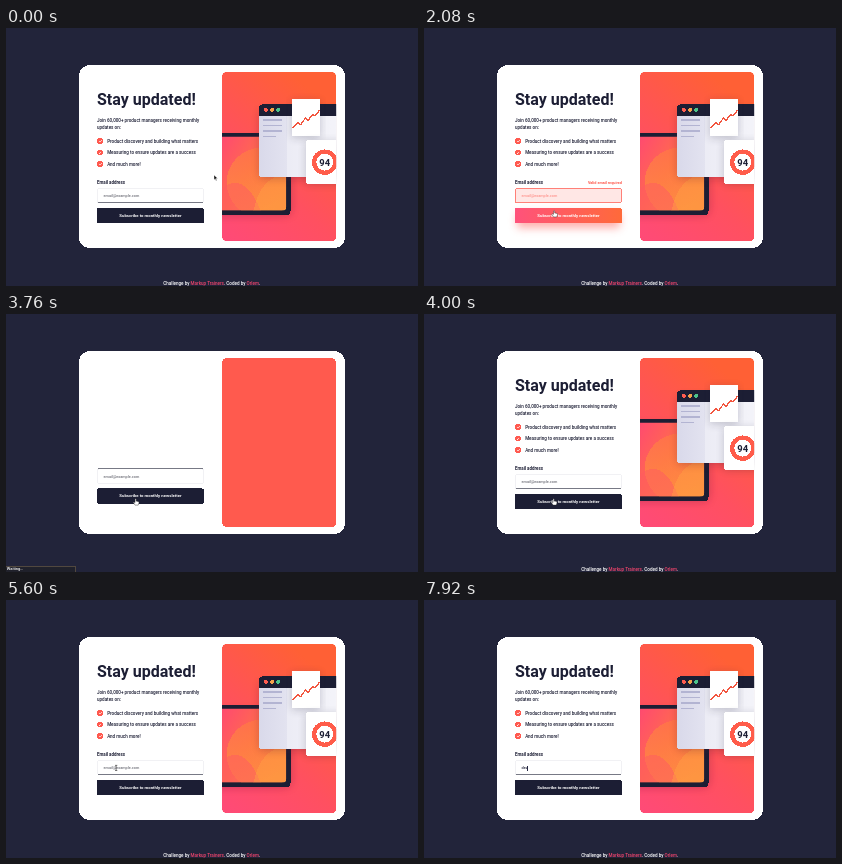
These frames come from a looping animation (412x258 px, 8000 ms). An HTML page:

```html
<!DOCTYPE html>
<html lang="en">
<head>
<meta charset="utf-8">
<title>Newsletter sign-up</title>
<style>
  html, body { margin: 0; width: 100%; height: 100%; overflow: hidden; background: #22243a; }
  svg { display: block; width: 100vw; height: 100vh; font: 500 16px Roboto, sans-serif; fill: #1c1e34; }
  .bold { font-weight: 700; }
  .small { font-size: 13.33px; }
  .link { fill: #f0446c; }
</style>
</head>
<body>
<svg viewBox="0 0 1440 901.75" shape-rendering="crispEdges">
  <defs>
    <linearGradient id="hot"><stop stop-color="#ff527b"/><stop offset="1" stop-color="#ff6a3a"/></linearGradient>
    <linearGradient id="backdrop" x1="0" y1="1" x2=".6" y2="0">
      <stop stop-color="#ff4a78"/><stop offset=".45" stop-color="#ff5060"/><stop offset="1" stop-color="#ff6035"/>
    </linearGradient>
    <linearGradient id="screen" x1="0" y1="0" x2="1" y2=".7">
      <stop stop-color="#ff4a70"/><stop offset=".5" stop-color="#ff6a4e"/><stop offset="1" stop-color="#fb9440"/>
    </linearGradient>
    <linearGradient id="glow" x1="0" y1="1" x2="1" y2="0">
      <stop stop-color="#ff9a3c"/><stop offset="1" stop-color="#ff6d45"/>
    </linearGradient>
    <linearGradient id="pane"><stop stop-color="#d9d9ea"/><stop offset="1" stop-color="#f7f7fc"/></linearGradient>
    <filter id="blur" x="-20%" y="-80%" width="140%" height="260%"><feGaussianBlur stdDeviation="14"/></filter>
    <clipPath id="art"><rect x="755" y="154" width="399" height="591" rx="17"/></clipPath>
    <clipPath id="display"><path d="M700 379H980V625Q980 638 967 638H700Z"/></clipPath>
  </defs>

  <rect x="255" y="130" width="930" height="639" rx="38" fill="#fff"/>

  <rect x="755" y="154" width="399" height="591" rx="17" fill="#ff5a4e"/>
  <g id="page">
    <g clip-path="url(#art)">
      <rect x="755" y="154" width="400" height="591" fill="url(#backdrop)"/>
      <path d="M700 388H980Q996 390 996 410V632Q996 653 975 653H700Z" fill="#7c1838" opacity=".4" filter="url(#blur)"/>
      <path d="M700 367H978Q995 367 995 384V637Q995 655 977 655H700Z"/>
      <g clip-path="url(#display)">
        <rect x="755" y="378" width="225" height="260" fill="url(#screen)"/>
        <circle cx="893" cy="540" r="122" fill="url(#glow)" opacity=".6"/>
        <path d="M755 560Q835 500 890 638H755Z" fill="#ff5a63" opacity=".5"/>
        <path d="M865 638Q890 520 980 510V638Z" fill="#ffa044" opacity=".45"/>
      </g>

      <rect x="888" y="290" width="290" height="235" fill="#57132f" opacity=".32" filter="url(#blur)"/>
      <rect x="885" y="268" width="300" height="253" rx="10" fill="url(#pane)"/>
      <path d="M885 306V278Q885 267 896 267H1160V306Z"/>
      <circle cx="908" cy="286" r="7" fill="#ff5c50"/>
      <circle cx="930" cy="286" r="7" fill="#f5a04a"/>
      <circle cx="951" cy="286" r="7" fill="#4cc38a"/>
      <path d="M982 306H1160V521H982Z" fill="#f4f4fa" opacity=".55"/>
      <path d="M899 322H965M899 341H965M899 360H965M899 379H945" stroke="#b3b4d2" stroke-width="5"/>

      <rect x="1000" y="255" width="98" height="128" opacity=".22" filter="url(#blur)"/>
      <rect x="1000" y="248" width="98" height="130" rx="3" fill="#fff"/>
      <path d="M1001 350L1020 330L1030 338L1046 315L1056 323L1071 303L1081 306L1097 286" fill="none" stroke="#f2553f" stroke-width="4.5"/>

      <rect x="1047" y="400" width="130" height="145" opacity=".22" filter="url(#blur)"/>
      <rect x="1047" y="392" width="130" height="153" rx="8" fill="#fff"/>
      <circle cx="1114" cy="469" r="37" fill="none" stroke="#ff5c4a" stroke-width="15"/>
      <text x="1114" y="481" class="bold" font-size="33" text-anchor="middle">94</text>
    </g>

    <text x="318" y="270" class="bold" font-size="56">Stay updated!</text>
    <text x="318" y="328">Join 60,000+ product managers receiving monthly</text>
    <text x="318" y="354">updates on:</text>
    <g id="list"></g>
    <text x="318" y="545" class="bold" font-size="15.5">Email address</text>
    <text x="719" y="897" text-anchor="middle" fill="#fff">Challenge by <tspan class="link">Markup Trainers</tspan>. Coded by <tspan class="link">Orlem</tspan>.</text>
  </g>

  <text id="error" x="692" y="545" class="bold small" text-anchor="end" fill="#ff5548">Valid email required</text>
  <g id="form">
    <rect id="field" x="319.5" y="560.5" width="371" height="51" rx="8" stroke-width="3.5"/>
    <path id="edge" stroke="#777985" stroke-width="3.5"/>
    <text id="value" x="341" y="592" class="small"></text>
    <path id="caret" stroke="#242742" stroke-width="3.5"/>

    <rect x="318" y="628" width="374" height="55" rx="8"/>
    <g id="hover">
      <rect x="324" y="648" width="362" height="50" rx="8" fill="#ff5f5a" opacity=".5" filter="url(#blur)"/>
      <rect x="318" y="628" width="374" height="55" rx="8" fill="url(#hot)"/>
    </g>
    <text x="505" y="660" class="bold" font-size="15" text-anchor="middle" fill="#fff">Subscribe to monthly newsletter</text>
  </g>

  <g id="status">
    <rect x="-4" y="881" width="247" height="30" fill="#20212b" stroke="#51483f" stroke-width="3.5"/>
    <text x="3" y="896" font-size="14" fill="#fff">Waiting…</text>
  </g>

  <g id="cursor" shape-rendering="auto" stroke-width="1.5">
    <path id="arrow" d="M0 0V17L4 13L7 20L10 19L7 12H13Z" fill="#111" stroke="#fff"/>
    <path id="beam" d="M-4 -9H4M0 -9V9M-4 9H4" stroke="#222" stroke-width="2"/>
    <path id="hand" d="M-2 1Q0 -2 2 1V8L11 10Q13 12 11 17L9 22H-2L-8 13Q-8 9 -2 13Z" fill="#fff" stroke="#222"/>
  </g>
</svg>
<script>
  const LOOP = 8000;
  const RELOAD = 3600, LOADED = 3920;
  const $ = id => document.getElementById(id);
  const show = (id, visible) => $(id).setAttribute('opacity', +visible);
  const clamp = x => Math.max(0, Math.min(1, x));
  const ease = x => x * x * (3 - 2 * x);

  const topics = ['Product discovery and building what matters',
    'Measuring to ensure updates are a success', 'And much more!'];
  $('list').innerHTML = topics.map((topic, i) => `
    <g transform="translate(328.5 ${395 + i * 40.3})">
      <circle r="10.5" fill="#ff5a50"/>
      <path d="M-4.5 0L-1 3.5L5 -3" fill="none" stroke="#fff" stroke-width="2.4"/>
      <text x="25" y="6">${topic}</text>
    </g>`).join('');

  // Pointer path: time, x, y
  const path = [[0, 727, 514], [80, 727, 514], [480, 470, 587], [640, 470, 587],
    [960, 455, 638], [2000, 455, 638], [2640, 453, 646], [4440, 453, 646], [4640, 432, 622], [4960, 385, 587]];
  const keystrokes = [6400, 6960, 7600];

  function pointer(t) {
    const next = path.findIndex(point => point[0] > t);
    if (next < 0) return path[path.length - 1].slice(1);
    const [a, b] = [path[next - 1], path[next]];
    const k = ease((t - a[0]) / (b[0] - a[0]));
    return [a[1] + (b[1] - a[1]) * k, a[2] + (b[2] - a[2]) * k];
  }

  function draw(t) {
    const reloading = t >= RELOAD && t < LOADED;
    const invalid = t >= 1840 && t < RELOAD;
    const focused = (t >= 560 && t < 1840) || t >= 5200;
    show('page', !reloading);
    show('status', reloading);
    show('error', invalid);
    // The form sits higher until the rest of the page has its fonts
    $('form').setAttribute('transform', `translate(0 ${reloading ? -19 : 0})`);

    const outlined = focused && t < RELOAD;
    $('field').setAttribute('fill', invalid ? '#ffe7e5' : '#fff');
    $('field').setAttribute('stroke', invalid ? '#ff8078' : outlined ? '#777985' : '#f1f1f4');
    $('edge').setAttribute('d', reloading ? 'M322 560.5H688' : 'M322 611.5H688');
    show('edge', !invalid && !outlined);

    const typed = 'dev'.slice(0, keystrokes.filter(k => t >= k).length);
    const value = $('value');
    value.textContent = typed || 'email@example.com';
    value.setAttribute('fill', typed ? '#1c1e34' : invalid ? '#ff8f88' : '#6c6d76');
    const caretX = 341 + (typed ? value.getComputedTextLength() + 1 : 0);
    $('caret').setAttribute('d', `M${caretX} 579V596`);
    show('caret', focused && (typed || t % 1000 < 500 || t < 1840));

    const [x, y] = pointer(t);
    const onField = y > 560 && y < 615 && x < 692;
    const onButton = y >= 628;
    $('cursor').setAttribute('transform', `translate(${x} ${y})`);
    show('cursor', t < 6240);
    show('beam', onField);
    show('hand', onButton);
    show('arrow', !onField && !onButton);
    show('hover', t < RELOAD ? clamp((t - 900) / 200) : 0);
  }

  function frame() {
    draw(performance.now() % LOOP);
    requestAnimationFrame(frame);
  }
  frame();
</script>
</body>
</html>
```
